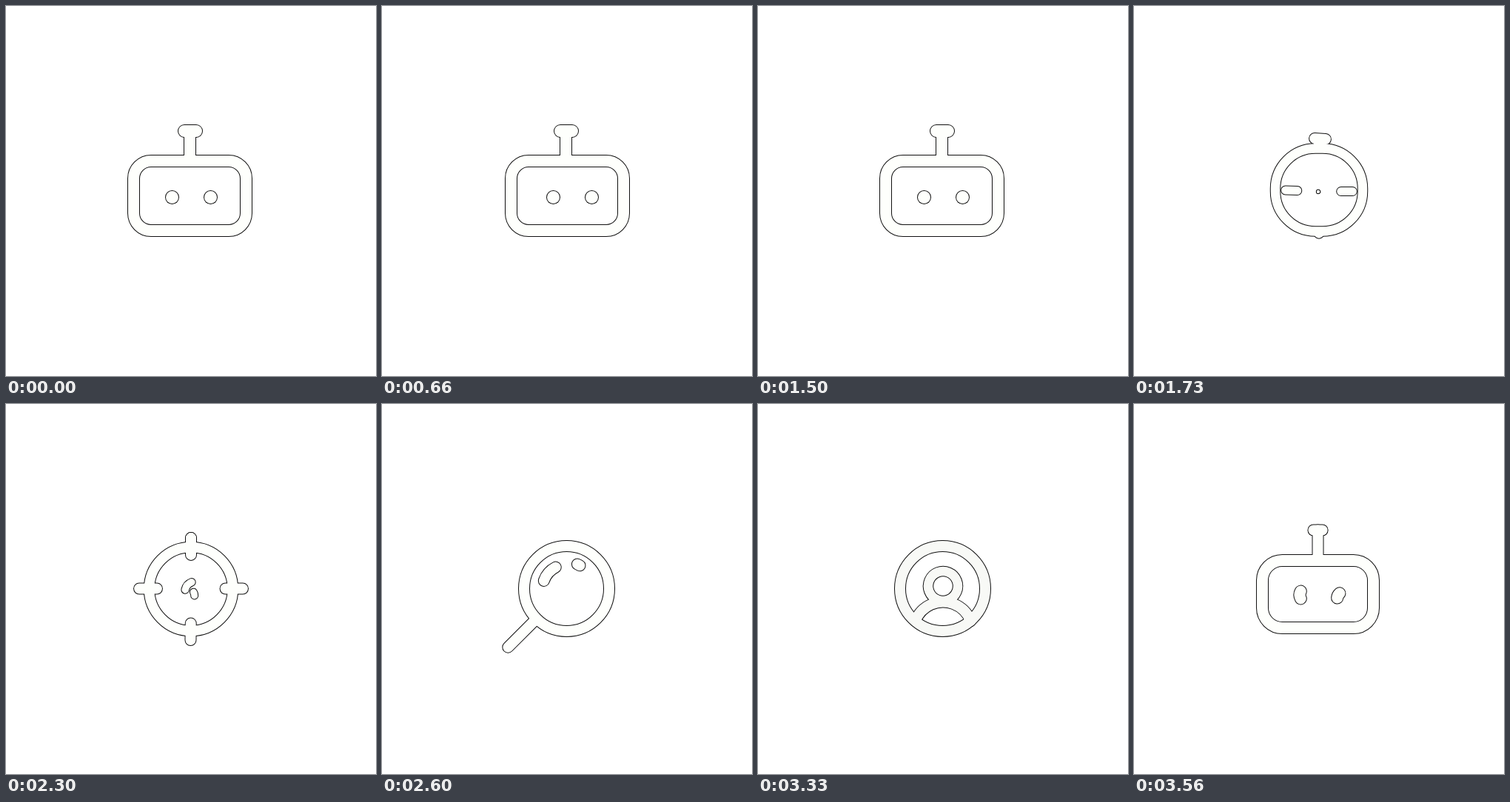
An HTML page with a canvas that plays this animation: 500 px wide and 500 px high, repeating every 3.6 s.

```html
<!DOCTYPE html>
<html lang="en">
<head>
<meta charset="utf-8">
<title>Morphing icon</title>
<style>
  html, body { margin: 0; width: 100%; height: 100%; overflow: hidden; background: #fff; }
  canvas { display: block; }
</style>
</head>
<body>
<canvas id="stage" width="500" height="500"></canvas>
<script>
const ctx = document.getElementById('stage').getContext('2d');
const LOOP = 3600;

// frame: cx, cy, half width, half height, corner radius, line width, shade
// knob, stem, left, right, low: x1, y1, x2, y2, line width
// a, b: cx, cy, radius, start degree, end degree, line width
const robot = {
  frame: [248.5, 256.5, 76, 47, 23.5, 15, 254],
  knob: [241, 169, 257, 169, 16],
  stem: [248.5, 169, 248.5, 209, 15],
  left: [224.5, 258.5, 224.5, 258.5, 17],
  right: [276.5, 258.5, 276.5, 258.5, 17],
  low: [248.5, 303, 248.5, 303, 13],
  a: [249, 251, .1, 175, 275, 0],
  b: [249, 251, .1, 270, 330, 0]
};
const rounded = {
  frame: [250, 248.5, 59, 56, 54, 12.5, 254],
  knob: [244, 179, 259, 180, 14],
  stem: [250, 180, 250, 190, 14],
  left: [205, 249, 221, 249.5, 11],
  right: [279.5, 250.5, 295, 250.5, 11],
  low: [250, 307, 250, 307, 13],
  a: [249, 251, .1, 175, 275, 4],
  b: [249, 251, .1, 270, 330, 4]
};
const crosshair = {
  frame: [250, 250, 56.5, 56.5, 56.5, 13.5, 254],
  knob: [250, 181, 250, 181, 14],
  stem: [250, 181, 250, 204, 14],
  left: [180, 249.5, 204, 249.5, 14],
  right: [296.5, 249.5, 320, 249.5, 14],
  low: [250, 296.5, 250, 319, 14],
  a: [250, 250, .1, 175, 275, 14],
  b: [250, 250, .1, 270, 330, 14]
};
const stretched = {
  ...crosshair,
  knob: [250, 177, 250, 177, 14],
  stem: [250, 177, 250, 202, 14],
  left: [174, 249.5, 199, 249.5, 14],
  right: [299, 249.5, 322, 249.5, 14],
  low: [250, 298, 250, 322, 14],
  a: [250, 250, .1, 175, 275, 17],
  b: [250, 250, .1, 270, 330, 17]
};
const split = {
  ...crosshair,
  a: [256, 254, 14, 192, 249, 9.5],
  b: [247, 258.5, 7.5, 327, 364, 9]
};
const lens = {
  frame: [249.5, 249.5, 57.5, 57.5, 57.5, 14, 254],
  knob: [249.5, 192, 249.5, 192, 13],
  stem: [249.5, 192, 249.5, 192, 13],
  left: [192, 249.5, 192, 249.5, 13],
  right: [307, 249.5, 307, 249.5, 13],
  low: [205, 294, 170.3, 328.7, 14],
  a: [249.5, 249.5, 32.5, 199, 243, 14],
  b: [249.5, 249.5, 36, 293.5, 300, 14]
};
const user = {
  ...lens,
  frame: [249.5, 249.5, 57.5, 57.5, 57.5, 14, 248],
  low: [209, 290, 209, 290, 13],
  a: [250, 307.5, 40, 201, 339, 14],
  b: [250, 246, 20, 113.5, 474, 12.5]
};
const robotEyes = {
  ...robot,
  left: [173, 250, 173, 250, 0],
  right: [324, 250, 324, 250, 0],
  a: [224.5, 258.5, .1, 150, 210, 17],
  b: [276.5, 258.5, .1, 185, 230, 17]
};
const almostRobot = {
  ...robotEyes,
  frame: [248.5, 257, 75, 45.5, 27, 15, 254],
  knob: [242.5, 170.5, 254.5, 170.5, 14],
  stem: [248.5, 170.5, 248.5, 209, 14],
  a: [234, 258, 10, 150, 210, 15],
  b: [284, 263, 9.4, 185, 230, 15]
};

const linear = p => p;
const easeIn = p => p * p;
const easeOut = p => 1 - (1 - p) ** 2;
const easeInOut = p => p * p * (3 - 2 * p);

// time, pose, easing towards that pose
const keys = [
  [0, robot],
  [1500, robot, linear],
  [1730, rounded, easeIn],
  [1900, stretched, easeOut],
  [2160, crosshair, easeInOut],
  [2260, crosshair, linear],
  [2300, split, linear],
  [2600, lens, easeOut],
  [2700, lens, linear],
  [3150, user, easeInOut],
  [3330, user, linear],
  [3560, almostRobot, easeInOut],
  [LOOP, robotEyes, linear]
];

function poseAt(t) {
  const i = keys.findIndex(key => key[0] > t);
  const [t0, from] = keys[i - 1], [t1, to, ease] = keys[i];
  const p = ease((t - t0) / (t1 - t0));
  const pose = {};
  for (const part in from) {
    pose[part] = from[part].map((v, k) => v + (to[part][k] - v) * p);
  }
  lookAside(pose, t);
  return pose;
}

function lookAside({ frame, left, right }, t) {
  if (t < 100 || t > 1200) return;
  const p = Math.sin(Math.PI * (t - 100) / 1100) ** 2;
  frame[0] += 2 * p;
  for (const eye of [left, right]) {
    eye[0] += 7 * p;
    eye[2] += 7 * p;
  }
}

function stroke(width, grow, trace) {
  if (width < .5) return;
  ctx.lineWidth = width + grow;
  ctx.beginPath();
  trace();
  ctx.stroke();
}

function drawParts(pose, grow) {
  const [cx, cy, hw, hh, r, width] = pose.frame;
  stroke(width, grow, () => ctx.roundRect(cx - hw, cy - hh, 2 * hw, 2 * hh, r));
  for (const part of ['knob', 'stem', 'left', 'right', 'low']) {
    const [x1, y1, x2, y2, w] = pose[part];
    stroke(w, grow, () => {
      ctx.moveTo(x1, y1);
      ctx.lineTo(x2 + .01, y2);
    });
  }
  for (const part of ['a', 'b']) {
    const [x, y, radius, start, end, w] = pose[part];
    const rad = Math.PI / 180;
    stroke(w, grow, () => ctx.arc(x, y, radius, start * rad, end * rad));
  }
}

function draw(now) {
  const pose = poseAt(now % LOOP);
  const shade = pose.frame[6];
  ctx.fillStyle = '#fff';
  ctx.fillRect(0, 0, 500, 500);
  ctx.lineCap = 'round';
  // A wider dark pass below leaves one outline around the joined parts.
  ctx.strokeStyle = '#111';
  drawParts(pose, 2);
  ctx.strokeStyle = `rgb(${shade}, ${shade + 1}, ${shade - 2})`;
  drawParts(pose, 0);
}

const begin = performance.now();
function tick() {
  draw(performance.now() - begin);
  requestAnimationFrame(tick);
}
tick();
</script>
</body>
</html>
```
